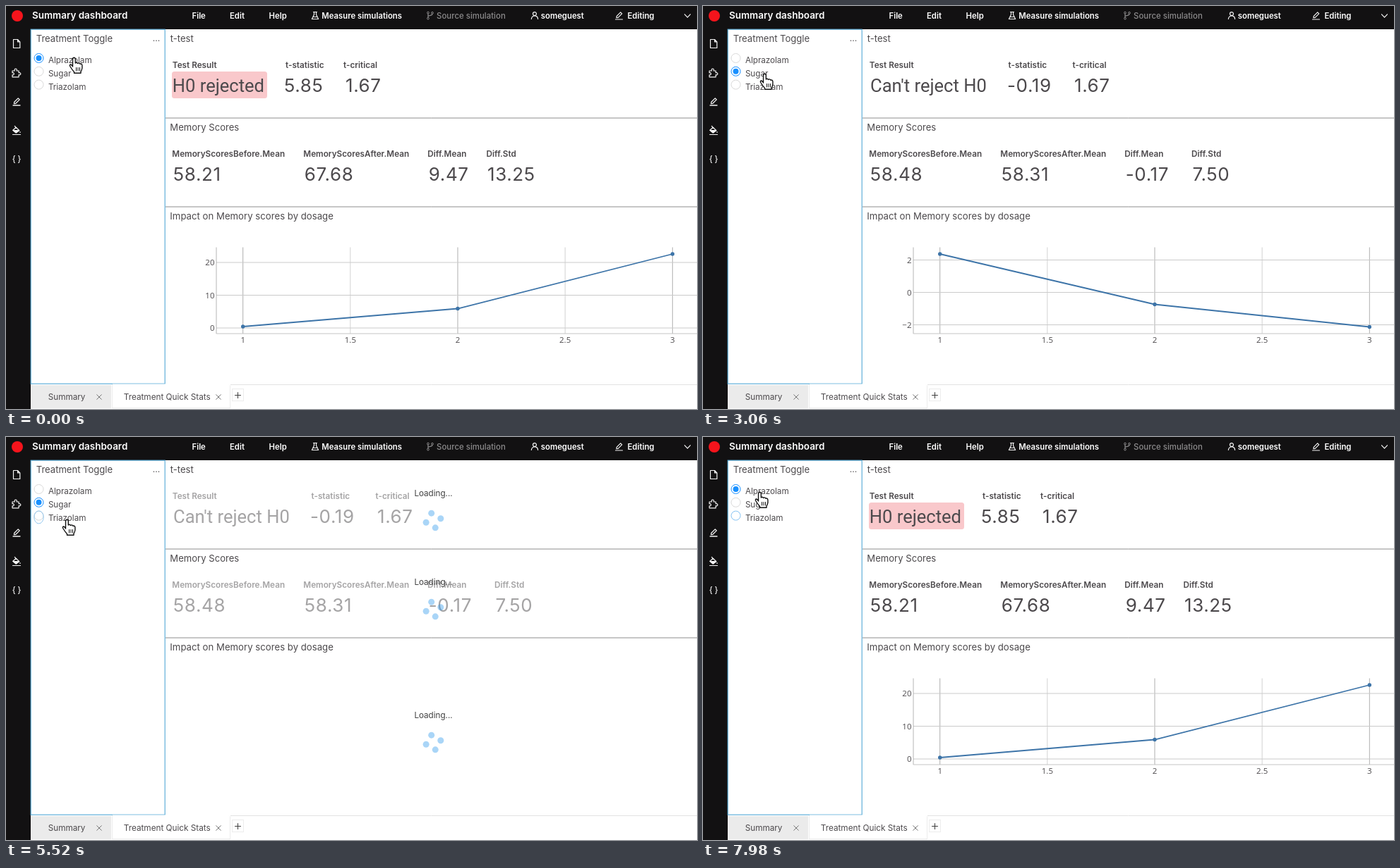
An HTML page with a canvas that plays this animation: 979x572 px, repeating every 8 s.

```html
<!DOCTYPE html>
<html lang="en">
<head>
<meta charset="utf-8">
<title>Summary dashboard</title>
<style>
html, body { margin: 0; width: 100%; height: 100%; overflow: hidden; background: #fff; }
canvas { display: block; }
</style>
</head>
<body>
<canvas id="stage" width="979" height="572"></canvas>
<script>
const ctx = document.getElementById('stage').getContext('2d');
const LOOP = 8000, STEP = 60;
const INK = '#4c494c', BLUE = '#1890ff', DARK = '#121112';
const UI = 'Inter, sans-serif';

const treatments = [
  { name: 'Alprazolam', result: 'H0 rejected', rejected: true,
    stats: [['t-statistic', 396, '5.85', 394], ['t-critical', 478, '1.67', 481]],
    scores: ['58.21', '67.68', '9.47', '13.25'], stdX: 680.5,
    ticks: [['20', 364], ['10', 410.5], ['0', 457]], line: [455, 429.5, 352] },
  { name: 'Sugar', result: "Can't reject H0",
    stats: [['t-statistic', 432.5, '-0.19', 431], ['t-critical', 523.5, '1.67', 526]],
    scores: ['58.48', '58.31', '-0.17', '7.50'], stdX: 692,
    ticks: [['2', 360.5], ['0', 406.5], ['−2', 452.5]], line: [352, 423.5, 455.5] },
  { name: 'Triazolam', result: "Can't reject H0",
    stats: [['t-statistic', 432.5, '-0.67', 431], ['t-critical', 523.5, '1.67', 526]],
    scores: ['57.19', '56.60', '-0.59', '7.10'], stdX: 692,
    ticks: [['1', 357.5], ['0', 393.5], ['−1', 429.5]], line: [438, 352, 455.5] }
];

const loads = [
  { from: 2540, to: 3000, next: 1 },
  { from: 5270, to: 5880, next: 2 },
  { from: 7790, to: 7920, next: 0 }
];

const moves = [
  { from: 480, to: 1080, a: [99, 84], b: [90, 107] },
  { from: 3720, to: 4200, a: [90, 107], b: [89, 128] },
  { from: 6540, to: 7260, a: [89, 128], b: [83, 89] }
];

function text(str, x, y, size, weight = 400, color = INK, family = UI, align = 'left') {
  ctx.font = `${weight} ${size}px ${family}`;
  ctx.fillStyle = color;
  ctx.textAlign = align;
  ctx.fillText(str, x, y);
}

function label(str, x, y) {
  text(str, x, y, 11.75, 600);
}

function figure(str, x, y) {
  ctx.letterSpacing = '0.6px';
  text(str, x, y, 26);
  ctx.letterSpacing = '0px';
}

function rect(x, y, w, h, color) {
  ctx.fillStyle = color;
  ctx.fillRect(x, y, w, h);
}

function line(x1, y1, x2, y2, color, width = 1) {
  ctx.strokeStyle = color;
  ctx.lineWidth = width;
  ctx.beginPath();
  ctx.moveTo(x1, y1);
  ctx.lineTo(x2, y2);
  ctx.stroke();
}

function dot(x, y, r, color) {
  ctx.fillStyle = color;
  ctx.beginPath();
  ctx.arc(x, y, r, 0, Math.PI * 2);
  ctx.fill();
}

function ring(x, y, rx, ry, color, width = 1) {
  ctx.strokeStyle = color;
  ctx.lineWidth = width;
  ctx.beginPath();
  ctx.ellipse(x, y, rx, ry, 0, 0, Math.PI * 2);
  ctx.stroke();
}

// Strokes (and optionally fills) a path drawn around a local origin.
function icon(path, x, y, color = '#f4f4f4', width = 1.2, fill) {
  ctx.save();
  ctx.translate(x, y);
  ctx.lineJoin = ctx.lineCap = 'round';
  const shape = new Path2D(path);
  if (fill) {
    ctx.fillStyle = fill;
    ctx.fill(shape);
  }
  ctx.strokeStyle = color;
  ctx.lineWidth = width;
  ctx.stroke(shape);
  ctx.restore();
}

const PENCIL = 'M-3.6 3.2 L-3.2 .8 L2.2 -4.6 L4.2 -2.6 L-1.2 2.8Z M-5 5.5 H5';
const FILE = 'M-4.5 -6 H1.5 L4.8 -2.7 V6 H-4.5Z M1.5 -6 V-2.7 H4.8';
const PUZZLE = 'M-5.5 -3 H-2.2 C-3.6 -7 2 -7 .6 -3 H3.6 V-.2 C7.2 -1.4 7.2 4 3.6 2.6 V5.8 H-5.5 V2.8 C-2.4 3.6 -2.4 -1 -5.5 -.2Z';
const BUCKET = 'M-2.6 -6 L-.8 -4.2 L3.8 .2 L-.8 3.6 L-5.2 -.2 L-.8 -4.2 M-5.5 6 H5.5';
const PAINT = 'M-5 0 H3.6 L-.8 3.4Z M5 2.2 V3';
const FLASK = 'M-2.5 -5 H2.5 M-1.5 -5 V-1.2 L-4.6 5 H4.6 L1.5 -1.2 V-5 M-3.2 2 H3.2';
const BRANCH = 'M-3 -2.6 V2.8 M-3 1.2 C-3 -.6 3 1 3 -2.2';
const USER = 'M-2.5 -2.4 A2.5 2.5 0 1 1 2.5 -2.4 A2.5 2.5 0 1 1 -2.5 -2.4 M-4.6 5 C-4.6 -1 4.6 -1 4.6 5';
const CROSS = 'M-3.3 -3.3 L3.3 3.3 M3.3 -3.3 L-3.3 3.3';
const HAND = 'M-4.5 2 V-8.5 Q-4.5 -10.7 -2.6 -10.7 Q-.7 -10.7 -.7 -8.5 V-3 Q1 -4.8 2.6 -2.5 ' +
  'Q4.4 -4 5.8 -1.8 Q8.6 -2.5 8.9 .5 V4 Q8.5 7 7 9 V11.3 H-2.5 V9.5 Q-5 7 -8 2 Q-9.5 -.5 -7.5 -1 Q-6 -1 -4.5 2Z';

function drawFrame() {
  rect(0, 0, 979, 572, '#fff');
  rect(0, 0, 979, 33, DARK);
  rect(0, 0, 35, 572, DARK);

  dot(16, 14, 8, '#f5141c');
  text('Summary dashboard', 37, 18.3, 13.45, 600, '#fff');
  const menu = [['File', 263.5], ['Edit', 317], ['Help', 372.5], ['Measure simulations', 447.3],
    ['someguest', 757.8], ['Editing', 880.5]];
  for (const [name, x] of menu) text(name, x, 18, 11.35, 600, '#fff');
  text('Source simulation', 610, 18, 11.45, 500, '#8b8a8b');
  icon(FLASK, 438, 13.5);
  icon(BRANCH, 601, 13.5, '#8b8a8b');
  for (const [x, y] of [[598, 9.6], [604, 9.8], [598, 17.6]]) ring(x, y, 1.4, 1.4, '#8b8a8b');
  icon(USER, 749, 13.5);
  icon(PENCIL, 868.5, 13.5);
  icon('M-4 -2.2 L0 2.2 L4 -2.2', 965.5, 14);

  icon(FILE, 15, 53.5);
  icon(PUZZLE, 14.5, 95);
  icon(PENCIL, 15, 135.5, '#f4f4f4', 1.3);
  icon(BUCKET, 15, 176.5);
  icon(PAINT, 15, 176.5, '#f4f4f4', 1.2, '#f4f4f4');
  text('{ }', 15, 221, 11, 500, '#f4f4f4', UI, 'center');
}

function drawPanels() {
  line(226, 159, 979, 159, '#8d8d8d');
  line(226, 285, 979, 285, '#8d8d8d');
  line(226, 537.5, 979, 537.5, '#e2e2e2');
  ctx.strokeStyle = '#5fb0da';
  ctx.lineWidth = 1.2;
  ctx.strokeRect(35.2, 33.2, 190, 503);
  ctx.lineWidth = 1;

  text('Treatment Toggle', 42.7, 50.5, 13.05);
  text('...', 213, 50, 12, 400, INK, UI, 'center');
  text('t-test', 232.7, 50.5, 13.1);
  text('Memory Scores', 232.3, 177, 13.1);
  text('Impact on Memory scores by dosage', 232.3, 302.5, 13.2);

  rect(35, 538, 114, 33, '#ebebeb');
  ctx.strokeStyle = '#ececec';
  ctx.strokeRect(150.5, 537.5, 167, 33);
  rect(151, 536.5, 167, 2, '#fff');
  ctx.strokeRect(320.5, 543.5, 16, 17);
  text('Summary', 59.8, 558.5, 11.7);
  text('Treatment Quick Stats', 166.8, 558.5, 11.75);
  icon(CROSS, 132, 555, '#777', 1);
  icon(CROSS, 301, 555, '#777', 1);
  icon('M-4 0 H4 M0 -4 V4', 328.5, 552.5, '#444', 1.1);
}

function drawRadios(chosen, focus, fading) {
  treatments.forEach(({ name }, i) => {
    const x = 46.5, y = 74 + 18.8 * i;
    const on = i === chosen;
    ring(x, y, 6.5, 6.5, on ? BLUE : i === fading ? '#86c3f3' : '#dadada');
    if (on) dot(x, y, 4, BLUE);
    if (i === focus) ring(x, y + 2.3, 6.7, 9, '#92c8f0');
    text(name, 59.9, 81 + 18.8 * i, 11.65);
  });
}

function drawValues(data, dim) {
  ctx.globalAlpha = dim ? .5 : 1;
  if (data.rejected) {
    ctx.fillStyle = '#f9c8cb';
    ctx.beginPath();
    ctx.roundRect(235, 93, 135, 38, 3.5);
    ctx.fill();
  }
  label('Test Result', 235.8, 88);
  text(data.result, data.rejected ? 235.8 : 237, 122, 25.55, 400, INK, 'Roboto, sans-serif');
  for (const [name, lx, value, vx] of data.stats) {
    label(name, lx, 88);
    figure(value, vx, 122);
  }
  const heads = [['MemoryScoresBefore.Mean', 235.3], ['MemoryScoresAfter.Mean', 421.3],
    ['Diff.Mean', 597.3], ['Diff.Std', data.stdX]];
  heads.forEach(([name, x], i) => {
    label(name, x, 214);
    figure(data.scores[i], x + 1.5, 248);
  });
  ctx.globalAlpha = 1;
}

function drawChart(data) {
  const plot = 'Open Sans, sans-serif';
  const gridX = i => 335.7 + 152.15 * i;
  for (let i = 0; i < 5; i++) {
    line(gridX(i), 342.5, gridX(i), 465, i % 2 ? '#d2d2d2' : '#aeaeae');
    text(String(1 + i / 2), gridX(i), 478, 11.5, 400, INK, plot, 'center');
  }
  for (const [name, y] of data.ticks) {
    line(298, y, 979, y, '#cbcbcb');
    text(name, 295.5, y + 4, 11.5, 400, INK, plot, 'right');
  }
  line(298, 342.5, 298, 465, '#b4b4b4');
  line(298, 465, 979, 465, '#c4c4c4');

  const points = data.line.map((y, i) => [gridX(2 * i), y]);
  ctx.strokeStyle = '#3d74a8';
  ctx.lineWidth = 1.8;
  ctx.beginPath();
  for (const [x, y] of points) ctx.lineTo(x, y);
  ctx.stroke();
  for (const [x, y] of points) dot(x, y, 2.7, '#3d74a8');
}

function drawSpinners(elapsed) {
  const turn = elapsed * .3 * Math.PI / 180;
  for (const y of [118.5, 244.5, 433.5]) {
    text('Loading...', 605.5, y - 35, 11.65, 400, '#404040', UI, 'center');
    for (let i = 0; i < 4; i++) {
      const a = turn + i * Math.PI / 2;
      dot(605.5 + 10.7 * Math.sin(a), y - 10.7 * Math.cos(a), 4.5, 'rgba(50,155,235,.42)');
    }
  }
}

function drawCursor(t) {
  let [x, y] = moves[0].a;
  for (const { from, to, a, b } of moves) {
    if (t < from) break;
    const p = Math.min(1, (t - from) / (to - from));
    const e = 1 - (1 - p) ** 2;
    x = a[0] + (b[0] - a[0]) * e;
    y = a[1] + (b[1] - a[1]) * e;
  }
  icon(HAND, x, y, '#111', 1.4, '#fff');
  icon('M.5 3.5 V8 M3 3.5 V8 M5.5 3.5 V8', x, y, '#111', 1);
}

function render(t) {
  const load = loads.find(l => t >= l.from && t < l.to);
  const chosen = loads.reduce((c, l) => t >= l.to ? l.next : c, 0);
  let focus = -1;
  if (t >= 2340 && t < 3000) focus = 1;
  if (t >= 5040 && t < 5880) focus = 2;

  drawFrame();
  drawPanels();
  drawRadios(chosen, focus, t >= 7920 ? 2 : -1);
  drawValues(treatments[chosen], load);
  if (load) drawSpinners(t - load.from);
  else drawChart(treatments[chosen]);
  drawCursor(t);
}

const start = performance.now();
function tick() {
  const t = (performance.now() - start) % LOOP;
  render(Math.floor(t / STEP) * STEP);
  requestAnimationFrame(tick);
}
tick();
</script>
</body>
</html>
```
